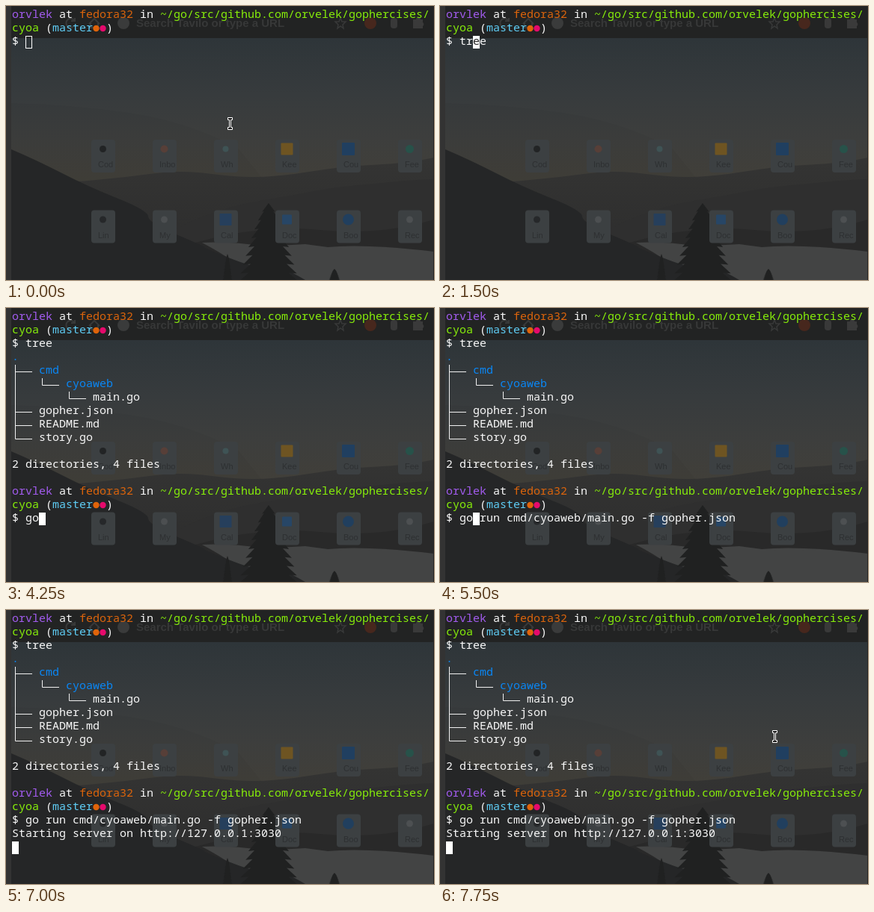
Write an HTML page that moves like this. It is 572x367 px and loops after 8 s.

```html
<!DOCTYPE html>
<html lang="en">
<head>
<meta charset="utf-8">
<title>Terminal session</title>
<style>
  html, body { margin: 0; width: 100%; height: 100%; overflow: hidden; background: #262626; }
  svg { display: block; width: 572px; height: 367px; }
  #terminal text {
    font: 15px "Noto Sans Mono", "DejaVu Sans Mono", monospace;
    font-variant-ligatures: none;
    white-space: pre;
    fill: #f8f8f8;
  }
  #terminal .user { fill: #a35cf0; }
  #terminal .host { fill: #db640c; }
  #terminal .path { fill: #87ee0a; }
  #terminal .branch { fill: #5fcdf5; }
  #terminal .dir { fill: #0a87f5; }
  #terminal .under { fill: #262626; }
  .dirty { fill: #e0640a; }
  .untracked { fill: #e60a6c; }
  .cursor { fill: #fff; }
  .hollow { fill: none; stroke: #fff; }
  .branches { fill: none; stroke: #f0f0f0; }
  .tile { fill: #3c4042; }
  .label { font: 11px "Liberation Sans", Arial, sans-serif; fill: #2e3032; }
  .hint { font: bold 15px "Liberation Sans", Arial, sans-serif; fill: #373838; }
</style>
</head>
<body>
<svg id="stage" viewBox="0 0 572 367">
  <defs>
    <linearGradient id="sky" x1="0" y1="42" x2="0" y2="235" gradientUnits="userSpaceOnUse">
      <stop offset="0" stop-color="#2e3539"/>
      <stop offset=".4" stop-color="#373b3d"/>
      <stop offset=".7" stop-color="#3d3e3d"/>
      <stop offset="1" stop-color="#413f39"/>
    </linearGradient>
    <linearGradient id="hills" x1="0" y1="205" x2="0" y2="330" gradientUnits="userSpaceOnUse">
      <stop offset="0" stop-color="#343433"/>
      <stop offset="1" stop-color="#2d2d2d"/>
    </linearGradient>
  </defs>

  <g id="page">
    <rect width="572" height="367" fill="url(#sky)"/>
    <path fill="#000" fill-opacity=".04" d="M7 130Q90 132 165 143T310 190L350 240H7Z"/>
    <path fill="url(#hills)" d="M7 240C70 238 110 234 150 230S205 222 235 222 290 229 330 229 400 222 440 217 520 214 572 203V367H7Z"/>
    <path fill="#2f2f2f" d="M225 300C270 276 310 265 350 259S430 243 470 240 530 233 572 232V367H225Z"/>
    <path fill="#292929" d="M250 318Q340 292 420 300T572 286V367H250Z"/>
    <path fill="#434444" d="M262 317Q300 315 345 322L400 319 430 323Q480 318 572 329V367H330Q310 342 262 317Z"/>
    <path fill="#252627" d="M7 192Q40 206 75 224T150 258 190 282 230 307 265 323 300 338 345 346 400 367H7Z"/>
    <g id="trees" fill="#202121"></g>
    <rect width="572" height="43" fill="#222323"/>
    <g fill="none" stroke="#383939" stroke-width="2">
      <path d="M91 19A6 6 0 1 0 92 25M92 16V20H87"/>
      <path d="M111 24L118 17L125 24M113 23V29H123V23"/>
      <path stroke-width="1.5" d="M447 16L449 21L454 21L450 25L451 30L447 27L443 30L444 25L440 21L445 21Z"/>
    </g>
    <circle cx="157" cy="23" r="8" fill="#3a3b3b"/>
    <text class="hint" x="174" y="28">Search Tavilo or type a URL</text>
    <circle cx="487" cy="23" r="8" fill="#47271d"/>
    <rect x="514" y="16" width="9" height="14" rx="4" fill="#393939"/>
    <path fill="#3a3a3a" d="M544 18H548A3 3 0 0 1 554 18H557V22A3 3 0 0 1 557 27V30H544Z"/>
    <g id="tiles"></g>
    <rect width="7" height="367" fill="#333"/>
    <rect x="571" width="1" height="367" fill="#242424"/>
  </g>

  <g id="terminal"></g>

  <path id="pointer" fill="#222" stroke="#fff"
        d="M.5 .5H6.5V3.5H4.5V13.5H6.5V16.5H.5V13.5H2.5V3.5H.5Z"/>
</svg>

<script>
const LOOP = 8000;
const CELL = { w: 9, h: 18, x: 8, y: 4 };
const byId = id => document.getElementById(id);
const terminal = byId('terminal');
const timed = [];

function add(parent, tag, attrs, content = '') {
  const node = document.createElementNS('http://www.w3.org/2000/svg', tag);
  for (const name in attrs) node.setAttribute(name, attrs[name]);
  node.textContent = content;
  parent.append(node);
  return node;
}

const colX = col => CELL.x + col * CELL.w;
const rowY = row => CELL.y + row * CELL.h;

function during(node, from, to = LOOP) {
  timed.push({ node, from, to });
}

function write(row, col, content, style = '', from = 0, to = LOOP) {
  during(add(terminal, 'text', { x: colX(col), y: rowY(row) + 12, class: style }, content), from, to);
}

function cursor(row, col, from, to) {
  during(add(terminal, 'rect', { x: colX(col), y: rowY(row), width: 9, height: 17, class: 'cursor' }), from, to);
}

function prompt(row, from) {
  write(row, 0, 'orvlek', 'user', from);
  write(row, 7, 'at', '', from);
  write(row, 10, 'fedora32', 'host', from);
  write(row, 19, 'in', '', from);
  write(row, 22, '~/go/src/github.com/orvelek/gophercises/', 'path', from);
  write(row + 1, 0, 'cyoa', 'path', from);
  write(row + 1, 5, '(', '', from);
  write(row + 1, 6, 'master', 'branch', from);
  ['dirty', 'untracked'].forEach((style, i) => {
    const dot = { cx: colX(12 + i) + 4.5, cy: rowY(row + 1) + 8, r: 4.2, class: style };
    during(add(terminal, 'circle', dot), from);
  });
  write(row + 1, 14, ')', '', from);
  write(row + 2, 0, '$', '', from);
}

// Scenery
function tree(x, top, height, width) {
  const layers = 9;
  let rightSide = '', leftSide = '';
  for (let i = 1; i <= layers; i++) {
    const y = top + height * i / layers;
    const reach = width / 2 * (i / layers) ** .7;
    rightSide += `L${x + reach} ${y}L${x + reach * .7} ${y - 1}`;
    leftSide = `L${x - reach * .7} ${y - 1}L${x - reach} ${y}` + leftSide;
  }
  add(byId('trees'), 'path', { d: `M${x} ${top}${rightSide}${leftSide}Z` });
}
tree(351, 264, 106, 82);
tree(439, 352, 22, 20);
tree(296, 332, 40, 14);

// Each tile: label, icon colour, icon size, round or square
const tiles = [
  ['Cod', '#222425', 9, 1], ['Inbo', '#573f38', 10, 1], ['Wh', '#3f5355', 8, 1],
  ['Kee', '#6e5422', 16, 0], ['Cou', '#203f60', 17, 0], ['Fee', '#27524a', 11, 1],
  ['Lin', '#26282a', 9, 1], ['My', '#4c4f51', 9, 1], ['Cal', '#263f5c', 16, 0],
  ['Doc', '#274666', 13, 0], ['Boo', '#213f5e', 15, 1], ['Rec', '#4d5052', 9, 1]
];
tiles.forEach(([label, color, size, round], i) => {
  const x = 114 + 82 * (i % 6);
  const y = i < 6 ? 179 : 273.5;
  const group = byId('tiles');
  add(group, 'rect', { x, y, width: 32, height: 44, rx: 4, class: 'tile' });
  add(group, 'rect', {
    x: x + 15.5 - size / 2, y: y + 12.5 - size / 2,
    width: size, height: size, rx: round ? size / 2 : 1, fill: color
  });
  add(group, 'text', { x: x + 9, y: y + 37, class: 'label' }, label);
});

// Terminal: first command
prompt(0, 0);
during(add(terminal, 'rect', { x: colX(2) + .5, y: rowY(2) + .5, width: 8, height: 16, class: 'hollow' }), 0, 250);
cursor(2, 2, 250, 750);
cursor(2, 3, 750, 1000);
cursor(2, 4, 1000, 2500);
write(2, 2, 't', '', 750);
write(2, 3, 'r', '', 1000);
write(2, 4, 'ee', '', 1500);
write(2, 4, 'e', 'under', 1500, 2500);

// Directory listing
const listed = 2500;
during(add(terminal, 'path', {
  class: 'branches',
  d: 'M12.5 76V175.5H35M12.5 85.5H35M12.5 139.5H35M12.5 157.5H35M48.5 94V103.5H71M84.5 112V121.5H107'
}), listed);
write(3, 0, '.', 'dir', listed);
write(4, 4, 'cmd', 'dir', listed);
write(5, 8, 'cyoaweb', 'dir', listed);
write(6, 12, 'main.go', '', listed);
['gopher.json', 'README.md', 'story.go'].forEach((name, i) => write(7 + i, 4, name, '', listed));
write(11, 0, '2 directories, 4 files', '', listed);

// Second command
prompt(13, listed);
cursor(15, 2, 2500, 4250);
cursor(15, 4, 4250, 6250);
cursor(16, 0, 6250, 7000);
cursor(17, 0, 7000, LOOP);
write(15, 2, 'go', '', 4250);
write(15, 5, 'run cmd/cyoaweb/main.go -f gopher.json', '', 5500);
write(16, 0, 'Starting server on http://127.0.0.1:3030', '', 7000);

// Pointer hides while typing, then jumps: from, to, x, y
const pointerStops = [
  [0, 750, 296, 149],
  [7250, 7500, 296, 149],
  [7500, 7750, 386, 139],
  [7750, LOOP, 444, 161]
];

function draw() {
  const t = performance.now() % LOOP;
  const active = (from, to) => t >= from && t < to;
  for (const { node, from, to } of timed) {
    node.style.visibility = active(from, to) ? 'visible' : 'hidden';
  }
  const stop = pointerStops.find(([from, to]) => active(from, to));
  const pointer = byId('pointer');
  pointer.style.visibility = stop ? 'visible' : 'hidden';
  if (stop) pointer.setAttribute('transform', `translate(${stop[2]} ${stop[3]})`);
  requestAnimationFrame(draw);
}
draw();
</script>
</body>
</html>
```
